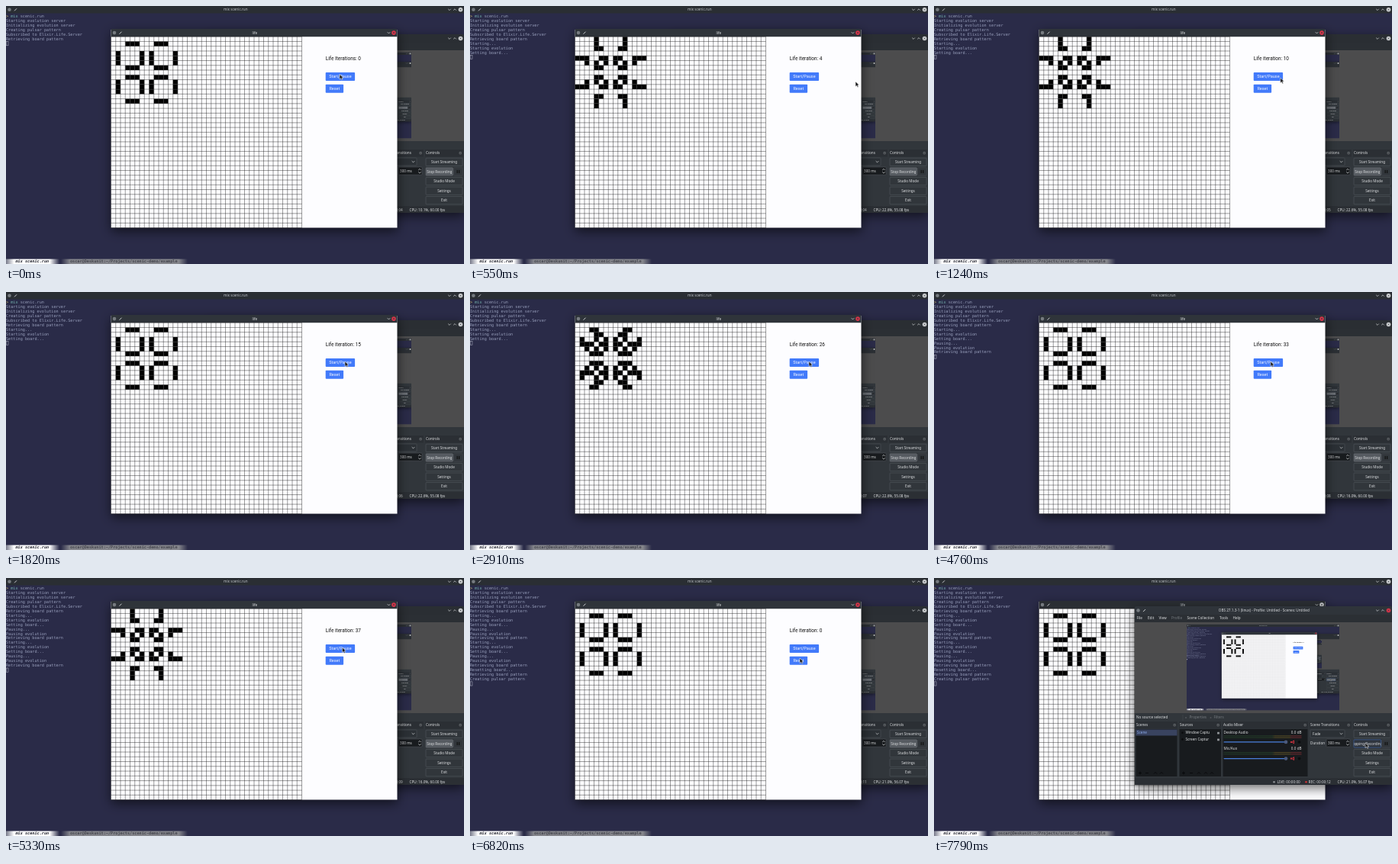
Animation, 600 px wide and 338 px high, one loop 7820 ms. Source, as an HTML page with a canvas:

```html
<!DOCTYPE html>
<html lang="en">
<head>
<meta charset="utf-8">
<title>life</title>
<style>
  html, body { margin: 0; width: 600px; height: 338px; overflow: hidden; background: #2a2b48; }
  canvas { display: block; width: 600px; height: 338px; }
</style>
</head>
<body>
<canvas id="stage"></canvas>
<script>
const LOOP = 7820, RESET = 6330, RAISE = 7760;
const UI = '4.65px "Noto Sans", sans-serif';
const MONO = '5.19px "DejaVu Sans Mono", monospace';
const LABEL = '6.45px Roboto, sans-serif';
const BUTTON = '5.5px Roboto, sans-serif';
const NIGHT = '#2a2b48', DARK = '#2b2f34', PANEL = '#31363b', LIST = '#181b1e';
const LIGHT = '#dcdee0', DIM = '#74797e', BLUE = '#3f6fc4';

const canvas = document.getElementById('stage');
const ctx = canvas.getContext('2d');
const ratio = window.devicePixelRatio || 1;
canvas.width = 600 * ratio;
canvas.height = 338 * ratio;

// Terminal output: time of appearance, then the lines
const log = [
  [0, 'Starting evolution server', 'Initializing evolution server', 'Creating pulsar pattern',
    'Subscribed to Elixir.Life.Server', 'Retrieving board pattern'],
  [60, 'Starting...', 'Starting evolution'], [90, 'Setting board...'],
  [3550, 'Pausing...', 'Pausing evolution'], [3580, 'Retrieving board pattern'],
  [4800, 'Starting...', 'Starting evolution'], [4830, 'Setting board...'],
  [5270, 'Pausing...', 'Pausing evolution'], [5300, 'Retrieving board pattern'],
  [RESET, 'Resetting board...', 'Retrieving board pattern'], [RESET + 30, 'Creating pulsar pattern']
];

const iterations = [[0, 0], [60, 0], [530, 4], [1820, 15], [2910, 26], [3670, 33], [4820, 33], [5360, 38]];

const pointer = [
  [0, 437, 89.5], [120, 437, 89.5], [450, 505, 99], [580, 505, 99], [790, 457, 96], [1030, 456, 95],
  [1790, 444, 91], [3820, 444, 91], [4200, 447, 87], [4580, 441, 91], [5390, 440.5, 91],
  [5450, 444, 99], [5680, 444, 99], [6000, 432, 105], [6820, 432, 105], [7580, 565, 216]
];

// Piecewise track of [time, ...values]
function track(keys, t, ease = k => k) {
  const i = keys.findIndex(k => k[0] > t);
  if (i < 0) return keys[keys.length - 1].slice(1);
  const [a, b] = [keys[i - 1], keys[i]];
  const k = ease((t - a[0]) / (b[0] - a[0]));
  return a.slice(1).map((v, j) => v + (b[j + 1] - v) * k);
}
const smooth = k => k * k * (3 - 2 * k);

// The three phases of the pulsar
const N = 16, cells = [...Array(N * N).keys()];
function evolve(board) {
  const at = (x, y) => x >= 0 && y >= 0 && x < N && y < N && board[y * N + x] ? 1 : 0;
  return cells.map(i => {
    const x = i % N, y = i / N | 0;
    let near = -at(x, y);
    for (let dy = -1; dy < 2; dy++) for (let dx = -1; dx < 2; dx++) near += at(x + dx, y + dy);
    return near === 3 || (near === 2 && at(x, y) === 1);
  });
}
const arm = v => [3, 4, 5, 9, 10, 11].includes(v);
const edge = v => [1, 6, 8, 13].includes(v);
const phases = [cells.map(i => {
  const x = i % N, y = i / N | 0;
  return (arm(x) && edge(y)) || (edge(x) && arm(y));
})];
phases.push(evolve(phases[0]));
phases.push(evolve(phases[1]));

function box(x, y, w, h, fill, radius = 0, stroke) {
  ctx.beginPath();
  ctx.roundRect(x, y, w, h, radius);
  ctx.fillStyle = fill;
  ctx.fill();
  if (stroke) { ctx.strokeStyle = stroke; ctx.lineWidth = 0.5; ctx.stroke(); }
}
function text(str, x, y, color = LIGHT, align = 'left', font = UI) {
  ctx.font = font;
  ctx.textAlign = align;
  ctx.textBaseline = 'middle';
  ctx.fillStyle = color;
  ctx.fillText(str, x, y);
}
function dot(x, y, r, color) {
  ctx.beginPath();
  ctx.arc(x, y, r, 0, 7);
  ctx.fillStyle = color;
  ctx.fill();
}
function line(color, width, ...pts) {
  ctx.beginPath();
  for (let i = 0; i < pts.length; i += 2) ctx.lineTo(pts[i], pts[i + 1]);
  ctx.strokeStyle = color;
  ctx.lineWidth = width;
  ctx.stroke();
}
function fade(x0, x1, ...stops) {
  const g = ctx.createLinearGradient(x0, 0, x1, 0);
  stops.forEach(([at, color]) => g.addColorStop(at, color));
  return g;
}
function clip(x, y, w, h, draw) {
  ctx.save();
  ctx.beginPath();
  ctx.rect(x, y, w, h);
  ctx.clip();
  draw();
  ctx.restore();
}
// Window body with a drop shadow; shadows ignore the transform, so scale them here
function windowBody(x, y, w, h, fill, depth) {
  const scale = ratio / 3 ** depth;
  ctx.save();
  ctx.shadowColor = 'rgba(0,0,0,.6)';
  ctx.shadowBlur = 14 * scale;
  ctx.shadowOffsetY = 4 * scale;
  box(x, y, w, h, fill);
  ctx.restore();
}

function chevron(x, y, dir) {
  line(LIGHT, 0.7, x - 1.8, y - dir * 0.9, x, y + dir * 0.9, x + 1.8, y - dir * 0.9);
}
function closeButton(x, y, color) {
  dot(x, y, 2.8, color);
  line('#31363b', 0.6, x - 1.1, y - 1.1, x + 1.1, y + 1.1);
  line('#31363b', 0.6, x + 1.1, y - 1.1, x - 1.1, y + 1.1);
}
function titleBar(x, y, w, h, title, active, closeColor, both = true) {
  const mid = y + h / 2;
  box(x, y, w, h, active ? '#2f343a' : '#2a2e33', [1.5, 1.5, 0, 0]);
  dot(x + 4.5, mid, 2.3, '#767b80');
  line(LIGHT, 0.9, x + 11, mid + 1.6, x + 14, mid - 1.4);
  text(title, x + w / 2 + 0.8, mid + 0.3, active ? LIGHT : '#c0c4c8', 'center');
  if (both) { chevron(x + w - 19, mid, 1); chevron(x + w - 12, mid, -1); }
  else chevron(x + w - 11, mid, 1);
  closeButton(x + w - 4.5, mid, closeColor);
}

function terminal(t) {
  box(0, 0, 600, 338, NIGHT);
  const ink = '#99a0bd', row = n => 13.7 + n * 5.95;
  text('>', 0, row(0), '#c9b36b', 'left', MONO);
  text('mix', 6.25, row(0), '#75b5b0', 'left', MONO);
  text('scenic.run', 18.75, row(0), ink, 'left', MONO);
  const shown = log.filter(e => e[0] <= t).flatMap(e => e.slice(1));
  shown.forEach((s, i) => text(s, 0, row(i + 1), ink, 'left', MONO));
  ctx.strokeStyle = '#b4b8c8';
  ctx.lineWidth = 0.5;
  ctx.strokeRect(0.4, row(shown.length + 1) - 2.8, 2.6, 5.2);
  titleBar(0, 0, 600, 9.5, 'mix scenic.run', false, '#d4d6d8');

  box(0, 331.5, 70, 6.5, fade(0, 70, [0, '#777a8b'], [0.15, '#fff'], [0.82, '#fff'], [1, NIGHT]));
  box(72, 331.5, 166, 6.5, fade(72, 238, [0, NIGHT], [0.07, '#85868c'], [0.93, '#85868c'], [1, NIGHT]));
  text('mix scenic.run', 12.5, 335, '#20212c', 'left', 'italic bold ' + MONO);
  text('oscar@Deskunit:~/Projects/scenic-demo/example', 84, 335, '#45464e', 'left', 'bold ' + MONO);
}

function life(t, active, depth) {
  const n = t >= RESET ? 0 : Math.floor(track(iterations, t)[0] + 1e-6);
  const left = 137.5, top = 40.2, cw = 6.25, ch = 6.26;
  windowBody(left, 31, 375, 259.6, '#fdfdff', depth);
  titleBar(left, 30, 375, 10.2, 'life', active, active ? '#d8344a' : '#c9cbcd', false);

  const ink = depth ? 'rgba(20,20,20,.45)' : '#141414';
  for (let i = 0; i <= 40; i++) {
    const x = left + i * cw, y = top + i * ch;
    line(ink, 0.42, x, top, x, top + 40 * ch);
    line(ink, 0.42, left, y, left + 40 * cw, y);
  }
  ctx.fillStyle = '#000';
  phases[n % 3].forEach((on, i) => {
    if (on) ctx.fillRect(left + (i % N) * cw + 0.1, top + (i / N | 0) * ch + 0.1, cw - 0.2, ch - 0.2);
  });

  text(t < RESET && n === 0 ? 'Life Iterations: 0' : 'Life iteration: ' + n, 418.8, 69.5, '#111', 'left', LABEL);
  [['Start/Pause', 87, 38.4], ['Reset', 102.7, 23.4]].forEach(([label, y, w]) => {
    box(418.7, y, w, 11, '#427afa', 0.9);
    text(label, 418.7 + w / 2, y + 5.8, '#f4f7ff', 'center', BUTTON);
  });
}

function mixerRow(name, y) {
  text(name, 379.5, y);
  text('0.0 dB', 481.5, y, LIGHT, 'right');
  for (const dy of [4, 6.2])
    box(379.5, y + dy, 102, 1.2, fade(379, 482, [0, '#1f3325'], [0.62, '#233826'], [0.66, '#4b4424'], [0.84, '#4b4424'], [0.87, '#5a272b'], [1, '#5a272b']));
  box(379.5, y + 11.9, 81, 1.4, '#4a80dc', 0.7);
  dot(461, y + 12.6, 2.3, '#4b5a7c');
  box(467, y + 11.6, 1.8, 2, '#c8323e');
  line('#c8323e', 1, 468.8, y + 12.6, 471.5, y + 10.6, 471.5, y + 14.6, 468.8, y + 12.6);
  dot(478.5, y + 12.6, 1.8, '#0b0d0f');
}

function obs(t, active, depth) {
  windowBody(263, 38, 337, 233, PANEL, depth);
  titleBar(263, 37, 337, 11, 'OBS 27.1.3-1 (linux) - Profile: Untitled - Scenes: Untitled', active, active ? '#d8344a' : '#cfd1d3');
  box(263, 48, 337, 10, DARK);
  [['File', 265.5], ['Edit', 280], ['View', 294.5], ['Profile', 311, DIM], ['Scene Collection', 331.5], ['Tools', 374], ['Help', 391.5]]
    .forEach(([s, x, color]) => text(s, x, 53, color));

  box(263, 58, 337, 119, '#4c4c4d');
  if (depth < 3) {
    ctx.save();
    ctx.translate(331, 60.8);
    ctx.scale(1 / 3, 1 / 3);
    clip(0, 0, 600, 338, () => scene(t, depth + 1));
    ctx.restore();
  }

  text('No source selected', 265, 182.8);
  line('#484d52', 0.5, 326, 179, 326, 187);
  dot(330, 183, 1, '#50555a');
  text('Properties', 334.5, 182.8, DIM);
  dot(362.5, 183, 1, '#50555a');
  text('Filters', 366.5, 182.8, DIM);

  [['Scenes', 264, 55], ['Sources', 321, 55], ['Audio Mixer', 378, 112], ['Scene Transitions', 492, 55], ['Controls', 549, 50]]
    .forEach(([s, x, w]) => {
      box(x, 188, w, 9.4, DARK);
      text(s, x + 1, 193.1);
      box(x + w - 5, 191.5, 2.3, 2.3, DARK, 0, '#94989c');
    });

  box(264.5, 198, 54, 62, LIST);
  box(264.5, 198.4, 54, 8, '#39435f');
  text('Scene', 266, 202.7, '#8fb0f0');
  box(321.5, 198, 54.5, 62, LIST);
  ['Window Captu', 'Screen Captur'].forEach((s, i) => {
    const y = 202.8 + i * 8.6;
    text(s, 329.5, y);
    dot(325.5, y, 1.3, '#0a0b0d');
    box(371, y - 1, 3, 2.8, '#8e9296', 0.5);
  });
  const marks = '#060708';
  [[268, 277, 288, 296], [325, 335, 345, 354, 362]].forEach(xs => xs.forEach((x, i) => {
    if (i < 2) line(marks, 0.8, x, 255.5, x + 4, 255.5);
    if (!i) line(marks, 0.8, x + 2, 253.5, x + 2, 257.5);
    if (i > 1) line(marks, 0.8, x, 256.5, x + 2, 254.5, x + 4, 256.5);
  }));
  box(378.5, 198, 111, 62, LIST);
  mixerRow('Desktop Audio', 202.3);
  mixerRow('Mic/Aux', 224);

  box(493, 199, 45, 10, '#2b3035', 0.8, '#555a60');
  text('Fade', 496, 204.3);
  chevron(533.5, 204, 1);
  text('Duration', 493, 216.3);
  box(514, 211, 31, 10.2, LIST, 0.8, '#555a60');
  text('300 ms', 516, 216.3);
  chevron(542, 214.2, -1);
  chevron(542, 218.2, 1);

  const stopping = t >= RAISE && depth === 0, hover = t >= 7580;
  [['Start Streaming', 199.2], ['Studio Mode', 224.4], ['Settings', 237], ['Exit', 249.5]].forEach(([s, y]) => {
    box(550, y, 48, 10.3, '#31363b', 0.8, '#595e64');
    text(s, 574, y + 5.5, LIGHT, 'center');
  });
  box(550, 211.8, 35.5, 10.3, stopping ? '#30363f' : '#565b61', 0.8, hover ? BLUE : '#6c7177');
  clip(550, 211, 35.5, 12, () => text(stopping ? 'Stopping Recording...' : 'Stop Recording', 567.8, 217.3, LIGHT, 'center'));
  box(586.8, 211.8, 11.2, 10.3, '#31363b', 0.8, '#4a4f55');
  box(590.6, 215, 1.2, 4, '#111');
  box(593, 215, 1.2, 4, '#111');

  box(263, 262, 337, 9, DARK);
  const sec = stopping ? 12 : 4 + Math.floor((t + 180) / 1000);
  const cpu = t < 300 ? '10.1%, 60.00' : t < 3300 ? '22.6%, 55.08' : t < 6310 ? '16.0%, 60.00' : '21.0%, 56.07';
  dot(445.5, 267.3, 1.3, '#8d9195');
  text('LIVE: 00:00:00', 449.5, 267.6);
  dot(487.5, 267.3, 1.3, '#c33');
  text('REC: 00:00:' + String(sec).padStart(2, '0'), 490.5, 267.6);
  text('CPU: ' + cpu + ' fps', 528.5, 267.6);
}

function arrow(t) {
  const [x, y] = track(pointer, t, smooth);
  ctx.beginPath();
  [0, 0, 0, 6.6, 1.6, 5.2, 2.8, 7.4, 3.9, 6.8, 2.8, 4.7, 4.8, 4.6].forEach((v, i, p) => {
    if (i % 2) ctx.lineTo(x + p[i - 1], y + v);
  });
  ctx.closePath();
  ctx.fillStyle = '#17181a';
  ctx.fill();
  ctx.strokeStyle = '#f2f2f2';
  ctx.lineWidth = 0.55;
  ctx.stroke();
}

function scene(t, depth) {
  const raised = t >= RAISE && depth === 0;
  terminal(t);
  if (raised) life(t, false, depth);
  obs(t, raised, depth);
  if (!raised) life(t, true, depth);
  arrow(t);
}

function frame() {
  ctx.setTransform(ratio, 0, 0, ratio, 0, 0);
  scene(performance.now() % LOOP, 0);
  requestAnimationFrame(frame);
}
frame();
</script>
</body>
</html>
```
